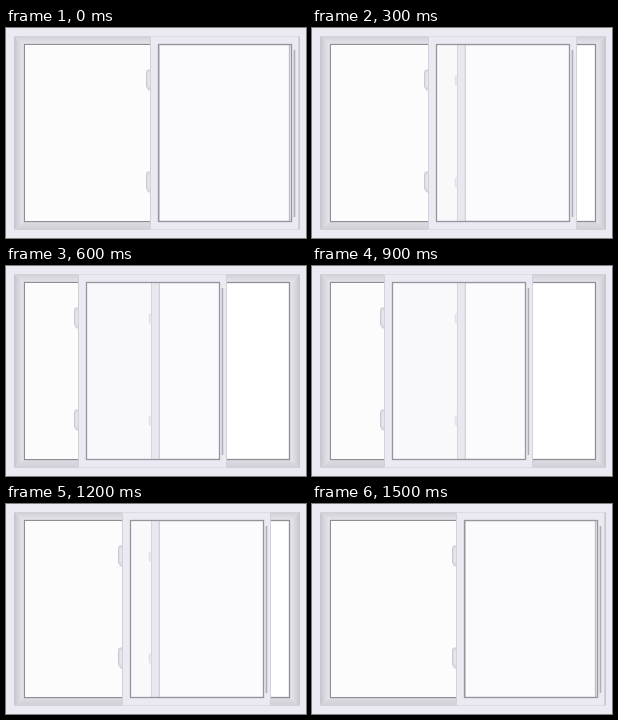
Animation of 300x210 px, one loop 2000 ms. Source, as an HTML page:

```html
<!DOCTYPE html>
<html lang="en">
<head>
<meta charset="utf-8">
<title>Sliding window</title>
<style>
html, body { margin: 0; width: 100%; height: 100%; overflow: hidden; background: #fff; }
svg { display: block; width: 100vw; height: 100vh; }
</style>
</head>
<body>
<svg viewBox="0 0 300 210" preserveAspectRatio="none">
  <defs>
    <linearGradient id="side">
      <stop offset="0" stop-color="#c6c5cc"/>
      <stop offset=".5" stop-color="#d9d8df"/>
      <stop offset="1" stop-color="#e8e7ee"/>
    </linearGradient>
    <linearGradient id="head" x2="0" y2="1">
      <stop offset="0" stop-color="#d0cfd6"/>
      <stop offset="1" stop-color="#e5e4eb"/>
    </linearGradient>
    <linearGradient id="sill" x2="0" y2="1">
      <stop offset="0" stop-color="#dcdbe2"/>
      <stop offset="1" stop-color="#d0cfd6"/>
    </linearGradient>
    <g id="catch">
      <path d="M4 0H1L0 2V17L1 18L2 20H4Z" fill="#dddde5" stroke="#bcbcc5" stroke-width=".7"/>
      <path d="M2.5 3V16" stroke="#efeff5"/>
    </g>
  </defs>

  <!-- outer frame -->
  <path fill="#ebeaf3" fill-rule="evenodd" d="M0 0H300V210H0ZM18 16V194H284V16Z"/>
  <path id="jamb" d="M8 8L18 16V194L8 202Z" fill="url(#side)"/>
  <use href="#jamb" transform="translate(302) scale(-1 1)"/>
  <path d="M8 8H294L284 16H18Z" fill="url(#head)"/>
  <path d="M8 202H294L284 194H18Z" fill="url(#sill)"/>
  <rect x="18.5" y="16.5" width="265" height="177" fill="none" stroke="#8f8e96" stroke-width="1.3"/>

  <!-- fixed pane -->
  <rect x="19" y="17" width="126" height="176" fill="#fcfcfd"/>
  <rect x="145" y="16" width="9" height="178" fill="#dddce4"/>
  <path d="M145.5 16V194" stroke="#bcbbc4"/>
  <path d="M153.3 16V194" stroke="#aaa9b2"/>
  <g fill="#dedee6" stroke="#bebec8" stroke-width=".7">
    <rect x="143.2" y="48" width="2.2" height="9" rx="1"/>
    <rect x="143.2" y="150" width="2.2" height="9" rx="1"/>
  </g>

  <!-- sliding sash -->
  <g id="sash">
    <use href="#catch" x="140.5" y="42"/>
    <use href="#catch" x="140.5" y="144"/>
    <rect x="152" y="16" width="134" height="178" fill="#f7f7fa" opacity=".45"/>
    <path fill="#ebeaf3" fill-rule="evenodd" d="M144 8H293V202H144ZM152 16V194H286V16Z"/>
    <path d="M144.5 8V202M292.5 8V202" stroke="#d2d1d9"/>
    <path d="M144 8.5H293M144 201.5H293" stroke="#dcdbe3"/>
    <rect x="152.5" y="16.5" width="133" height="177" fill="none" stroke="#96959e" stroke-width="1.3"/>
    <path d="M288.3 22V189" stroke="#a9a8b1" stroke-width="1.2"/>
    <path d="M289.6 22V189" stroke="#dbdae2"/>
  </g>
</svg>
<script>
const loop = 2000, travel = 80, last = 5;
// moments at which the sash jumps one stop further, then one stop back
const jumps = [0, 200, 300, 500, 600, 800, 900, 1100, 1200, 1400, 1500, loop];

const shift = i => {
  const stop = Math.max(0, last - Math.abs(last - i));
  return -travel / 2 * (1 - Math.cos(Math.PI * stop / last));
};

document.getElementById("sash").animate(
  jumps.map((time, i) => ({
    offset: time / loop,
    transform: `translateX(${Math.round(shift(i))}px)`,
    easing: "step-end"
  })),
  { duration: loop, iterations: Infinity }
);
</script>
</body>
</html>
```
